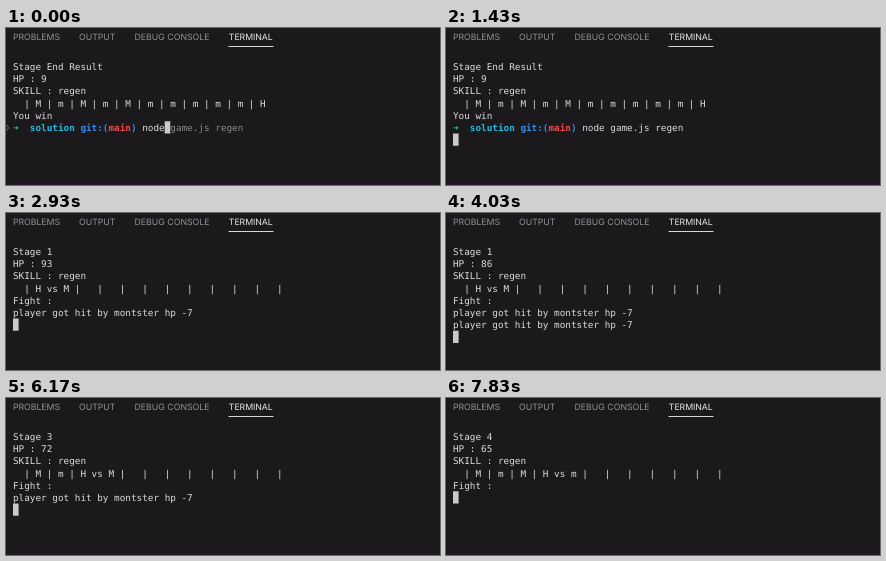
These frames come from a looping animation (434x157 px, 8 s). An HTML page:

```html
<!DOCTYPE html>
<html lang="en">
<head>
<meta charset="utf-8">
<title>Terminal game</title>
<style>
  html, body { margin: 0; width: 100%; height: 100%; overflow: hidden; background: #1b191c; }
  svg { display: block; width: 100vw; height: 100vh; }
  text { white-space: pre; text-rendering: geometricPrecision; }
  #term { font: 9.33px "DejaVu Sans Mono", monospace; }
  #tabs { font: 8.75px Inter, Arial, sans-serif; fill: #929094; }
</style>
</head>
<body>
<svg id="stage" viewBox="0 0 434 157">
  <rect width="434" height="157" fill="#1b191c"/>
  <rect y="156" width="434" height="1" fill="#28192a"/>
  <g id="tabs">
    <text x="7" y="12.2" textLength="47">PROBLEMS</text>
    <text x="73" y="12.2" textLength="36.5">OUTPUT</text>
    <text x="128.5" y="12.2" textLength="75">DEBUG CONSOLE</text>
    <text x="222.8" y="12.2" textLength="44" fill="#e8e8e8">TERMINAL</text>
  </g>
  <rect x="222.5" y="18" width="45" height="1" fill="#d8d8d8"/>
  <g id="term"></g>
</svg>
<script>
const LOOP = 8000, LEFT = 7, COL = 5.617, TOP = 32, ROW = 12.25;
const FG = '#dcdcdc', GHOST = '#8b8a8d', BG = '#1b191c', BLOCK = '#c9c9c9';
const term = document.getElementById('term');
const COMMAND = 'game.js regen';
const HIT = 'player got hit by montster hp -7';
const MONSTERS = [...'MmMmMmmmmm'];

const run = (row, col, str, fill = FG, bold = false) =>
  `<text x="${LEFT + col * COL}" y="${TOP + row * ROW + 9.8}" fill="${fill}"` +
  `${bold ? ' font-weight="700"' : ''}>${str}</text>`;

const cursor = (row, col) =>
  `<rect x="${LEFT + col * COL}" y="${TOP + row * ROW}" width="5.6" height="12.25" fill="${BLOCK}"/>`;

const lines = list => list.map((str, row) => run(row, 0, str)).join('');

const track = cells => '  | ' + cells.join(' | ');

// Shell prompt below the previous result; typed = cursor column, or null once entered
function prompt(typed) {
  const accepted = typed === null || typed > 28;
  let out = lines(['Stage End Result', 'HP : 9', 'SKILL : regen',
    track([...MONSTERS, 'H']), 'You win']);
  out += run(5, 0, '➜', '#23d18b', true) + run(5, 3, 'solution', '#29b8db', true) +
    run(5, 12, 'git:(', '#3b8eea', true) + run(5, 17, 'main', '#f14c4c', true) +
    run(5, 21, ')', '#3b8eea', true) + run(5, 23, 'node');
  out += run(5, 28, COMMAND, accepted ? FG : GHOST);
  if (typed === null) return out + cursor(6, 0);
  out += '<circle cx="0" cy="99.8" r="2.4" fill="none" stroke="#69676b"/>' + cursor(5, typed);
  return typed === 28 ? out + run(5, 28, COMMAND[0], BG) : out;
}

function intro() {
  return lines(['Stage Start', 'HP : 100', 'SKILL : regen',
    track(['H', ...Array(9).fill(' '), '']), '']) + cursor(5, 0);
}

function fight(stage, hp, hits) {
  const cells = MONSTERS.map((m, i) => i < stage - 1 ? m : i === stage - 1 ? 'H vs ' + m : ' ');
  const log = ['Stage ' + stage, 'HP : ' + hp, 'SKILL : regen', track([...cells, '']),
    'Fight :', ...Array(hits).fill(HIT)];
  return lines(log) + cursor(log.length, 0);
}

const scenes = [
  [0, () => prompt(27)],
  [30, () => prompt(28)],
  [570, () => prompt(41)],
  [970, () => prompt(null)],
  [1470, intro],
  [2470, () => fight(1, 100, 0)],
  [2930, () => fight(1, 93, 1)],
  [4030, () => fight(1, 86, 2)],
  [4630, () => fight(2, 86, 0)],
  [5100, () => fight(2, 79, 1)],
  [5700, () => fight(3, 79, 0)],
  [6170, () => fight(3, 72, 1)],
  [7230, () => fight(3, 65, 2)],
  [7830, () => fight(4, 65, 0)]
];

let shown = null;
function render(t) {
  const scene = scenes.findLast(([at]) => at <= t);
  if (scene === shown) return;
  shown = scene;
  term.innerHTML = scene[1]();
}

const start = performance.now();
function tick() {
  render((performance.now() - start) % LOOP);
  requestAnimationFrame(tick);
}
tick();
</script>
</body>
</html>
```
